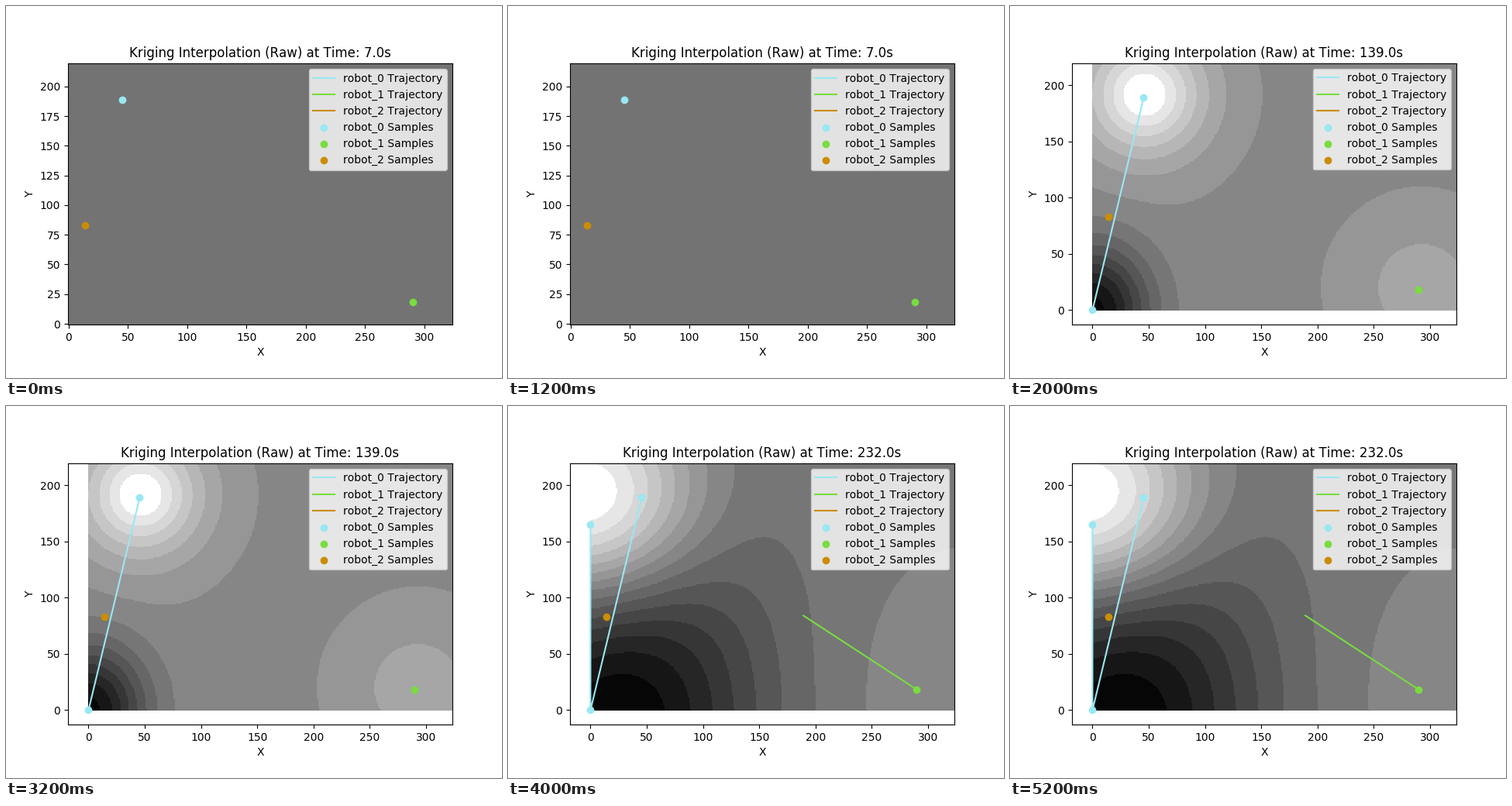
These frames come from a looping animation (640x480 px, 6000 ms). A matplotlib script:

```python
import numpy as np
import matplotlib.pyplot as plt
from matplotlib.animation import FuncAnimation

plt.rcParams["font.family"] = "DejaVu Sans"
plt.rcParams["text.kerning_factor"] = 6   # whole-pixel kerning

COLORS = ("#98e8f2", "#79dc40", "#cb8d00")
W, H = 324, 220
X, Y = np.meshgrid(np.arange(W), np.arange(H))

ROBOT_0, ROBOT_1, ROBOT_2 = (45.5, 188.8), (290, 18.3), (14.1, 82.8)
HOME, WALL, AWAY = (0, 0), (0, 165), (189.2, 84.1)


def bump(height, cx, cy, lx, ly, power=2):
    """Hill, or hollow if the height is negative, that fades with distance."""
    return height * np.exp(-np.hypot((X - cx) / lx, (Y - cy) / ly) ** power)


def bands(value):
    """Gray of each of the sixteen equal bands."""
    band = np.clip(np.round(value), 0, 15)
    return np.where(band == 15, 255, 6 + 16 * band)


def flat_field():
    return np.full((H, W), 0x73)


def peak_field():
    return bands(8.2
                 + bump(7.6, 46, 191, 51.5, 51.5, 1.66)
                 + bump(2.1, 292, 20, 60, 60, 1.66)
                 + bump(-8, 0, 0, 49, 56))


def slope_field():
    return bands(7.3
                 + bump(12.4, 0, 183, 98, 98)
                 + bump(0.9, 323, 10, 105, 112)
                 + bump(-8, 22, 0, 124, 250))


# Title time, field, tick gap in y, samples and trails of each robot
STEPS = [
    (7.0, flat_field, 25,
     [[ROBOT_0], [ROBOT_1], [ROBOT_2]],
     [[ROBOT_0], [ROBOT_1], [ROBOT_2]]),
    (139.0, peak_field, 50,
     [[ROBOT_0, HOME], [ROBOT_1], [ROBOT_2]],
     [[ROBOT_0, HOME], [ROBOT_1], [ROBOT_2]]),
    (232.0, slope_field, 50,
     [[ROBOT_0, HOME, WALL], [ROBOT_1], [ROBOT_2]],
     [[ROBOT_0, HOME, WALL], [ROBOT_1, AWAY], [ROBOT_2]]),
]

fig, ax = plt.subplots(figsize=(6.4, 4.8), dpi=100)


def draw(i):
    time, field, gap, samples, trails = STEPS[i]
    ax.clear()
    ax.imshow(field(), cmap="gray", vmin=0, vmax=255, origin="lower",
              interpolation="nearest")
    for k, color in enumerate(COLORS):
        ax.plot(*zip(*trails[k]), color=color, label=f"robot_{k} Trajectory")
    for k, color in enumerate(COLORS):
        ax.scatter(*zip(*samples[k]), color=color, label=f"robot_{k} Samples")
    ax.set_xticks(range(0, 301, 50))
    ax.set_yticks(range(0, 201, gap))

    # The view widens once a robot has reached the corner
    left, bottom = (-18.2, -12.75) if HOME in samples[0] else (-0.5, -0.5)
    ax.set_xlim(left, W - 0.5)
    ax.set_ylim(bottom, H - 0.5)

    ax.set_xlabel("X")
    ax.set_ylabel("Y")
    ax.set_title(f"Kriging Interpolation (Raw) at Time: {time}s")
    ax.legend(loc="upper right")
    return []


anim = FuncAnimation(fig, draw, frames=len(STEPS), init_func=lambda: draw(0),
                     interval=2000, repeat=True, repeat_delay=0)
plt.show()
```
